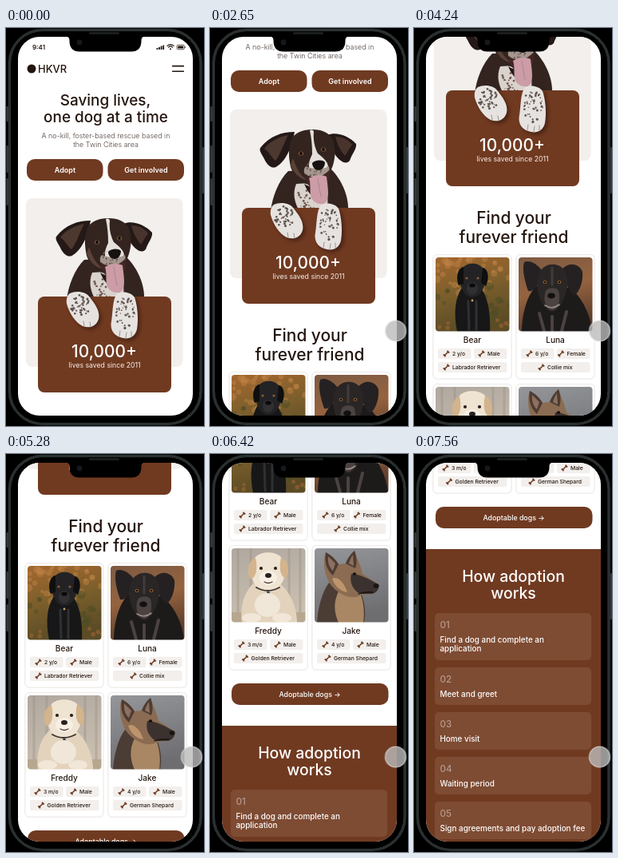
These frames come from a looping animation (248x498 px, 8000 ms). An HTML page:

```html
<!DOCTYPE html>
<html lang="en">
<head>
<meta charset="utf-8">
<title>Dog rescue app</title>
<style>
  html, body { margin: 0; width: 100%; height: 100%; overflow: hidden; background: #000; }
  svg { display: block; width: 248px; height: 498px; }
  text { font-family: Inter, "Open Sans", sans-serif; }
</style>
</head>
<body>
<svg id="stage" viewBox="0 0 248 498" xmlns="http://www.w3.org/2000/svg"></svg>
<script>
const BROWN = '#703a21', INK = '#24150e', SAND = '#f2efec';
const LOOP = 8000, STEP = 36.81;

// ---------- helpers ----------
const rect = (x, y, w, h, r, fill, more = '') =>
  `<rect x="${x}" y="${y}" width="${w}" height="${h}" rx="${r}" fill="${fill}" ${more}/>`;
const dot = (x, y, r, fill, ry = r, more = '') =>
  `<ellipse cx="${x}" cy="${y}" rx="${r}" ry="${ry}" fill="${fill}" ${more}/>`;
const path = (d, fill, more = '') => `<path d="${d}" fill="${fill}" ${more}/>`;
const line = (d, color, width) =>
  path(d, 'none', `stroke="${color}" stroke-width="${width}" stroke-linecap="round"`);
const text = (x, y, s, size, weight = 550, fill = INK, anchor = 'middle') =>
  `<text x="${x}" y="${y}" font-size="${size}" font-weight="${weight}" fill="${fill}" text-anchor="${anchor}">${s}</text>`;
const group = (x, y, body, more = '') => `<g transform="translate(${x} ${y})" ${more}>${body}</g>`;
const gradient = (id, ...colors) =>
  `<linearGradient id="${id}" x1="0" y1="0" x2=".25" y2="1">` +
  colors.map((c, i) => `<stop offset="${i / (colors.length - 1)}" stop-color="${c}"/>`).join('') +
  '</linearGradient>';
const blur = (id, amount) =>
  `<filter id="${id}" x="-30%" y="-30%" width="160%" height="160%"><feGaussianBlur stdDeviation="${amount}"/></filter>`;

let seed = 7;
const rnd = () => (seed = seed * 16807 % 2147483647) / 2147483647;
function speckle(cx, cy, rx, ry, n, fill, size = 0.9) {
  let out = '';
  for (let i = 0; i < n; i++) {
    const a = rnd() * 6.283, d = Math.sqrt(rnd());
    out += dot((cx + Math.cos(a) * d * rx).toFixed(1), (cy + Math.sin(a) * d * ry).toFixed(1),
      (size * (0.5 + rnd() * 0.7)).toFixed(2), fill);
  }
  return out;
}

// ---------- header and hero ----------
function header() {
  const bars = [0, 1, 2, 3].map(i => rect(188.5 + i * 2.6, 25 - i * 1.2, 1.8, 2 + i * 1.2, 0.5, INK)).join('');
  const wifi = [4.2, 2.5].map(r =>
    line(`M${206 - r} ${26.6 - r}Q206 ${25.4 - r * 1.55} ${206 + r} ${26.6 - r}`, INK, 1.2)).join('');
  const battery = rect(214, 21.2, 9.4, 5.6, 1.5, 'none', `stroke="${INK}" stroke-width=".7"`) +
    rect(215.2, 22.4, 7, 3.2, 0.7, INK) + rect(224, 23, 0.8, 2, 0.4, INK);
  return text(41, 27, '9:41', 8, 600) + bars + wifi + dot(206, 26.2, 1, INK) + battery +
    dot(32, 51, 5.5, INK) + text(40, 56, 'HKVR', 13, 500, INK, 'start') +
    rect(208, 46.8, 15, 1.6, 0.5, INK) + rect(208, 53.4, 15, 1.6, 0.5, INK) +
    text(124.5, 97, 'Saving lives,', 18.9) + text(125, 117.5, 'one dog at a time', 18.9) +
    text(125, 138, 'A no-kill, foster-based rescue based in', 8.95, 300, '#51443e') +
    text(125, 149, 'the Twin Cities area', 8.95, 300, '#51443e') +
    rect(26, 164, 95.5, 27, 10, BROWN) + rect(127.5, 164, 95.5, 27, 10, BROWN) +
    text(74, 181.4, 'Adopt', 9, 600, '#fff') + text(175.5, 181.4, 'Get involved', 9, 600, '#fff');
}

function heroDog() {
  const coat = '#33241f', dark = '#241916', white = '#e6e0dc';
  const body =
    path('M76 340C78 322 86 302 98 290L152 288C164 300 174 320 173 340Z', coat) +
    path('M108 306C103 318 106 330 112 340L146 340C149 328 147 314 142 304Z', '#d9d2cd') +
    speckle(126, 324, 18, 15, 40, '#6b574e', 1.2) +
    path('M118 306C126 312 140 312 147 304L147 322C138 328 126 326 118 306Z', dark);
  const ears =
    path('M106 241C90 241 75 246 63 261C61 265 66 270 69 277C73 284 79 288 84 284C92 279 97 270 102 258Z', dark) +
    path('M98 245C86 247 75 253 68 262C74 266 78 274 82 277C88 270 92 256 98 245Z', '#4d3830') +
    path('M147 245C158 240 174 246 183 256C184 262 178 268 175 277C170 283 162 277 157 270C153 264 150 255 147 245Z', dark) +
    path('M157 247C166 247 174 251 178 257C174 262 172 267 169 271C163 264 159 256 157 247Z', '#49342d');
  const head =
    path('M103 248C110 240 119 238 129 238C140 238 150 242 154 251C158 263 157 277 152 288C148 301 140 308 129 308C116 307 105 297 101 285C98 271 98 258 103 248Z', coat) +
    path('M104 274C108 286 113 296 122 301C112 301 104 291 101 282Z', '#5a4136') +
    path('M125 239C128 238 130 239 130 241C129 251 131 260 135 268C140 272 147 277 148 284C144 289 137 291 128 290C122 287 123 279 128 269C128 258 127 248 125 239Z', white) +
    path('M120 284C127 287 142 289 149 284C151 291 147 297 142 298C134 296 126 299 120 296C117 292 117 287 120 284Z', '#a4968f') +
    speckle(130, 287, 11, 9, 34, '#63514a', 0.9);
  const mouth =
    path('M119 293C126 300 140 299 149 289C152 301 147 311 138 315C128 316 119 306 119 293Z', '#432725') +
    path('M124 299C130 295 141 294 146 297C147 307 150 321 146 328C141 334 131 331 127 324C124 316 127 308 124 299Z', '#cc9da6') +
    line('M135 299Q137 313 139 322', '#b08590', 1) +
    path('M128 280C131 276 141 275 144 279C144 285 140 289 136 289C132 289 128 285 128 280Z', '#171211');
  const eye = (x, y) => dot(x, y, 3.2, '#80563d', 2.6) + dot(x, y, 1.9, '#100c0b');
  return `<g filter="url(#fur)">${body}${ears}${head}${mouth}${eye(114, 268)}${eye(142, 263)}</g>`;
}

function paws() {
  const paw = (d, cx, cy, rx, ry) =>
    group(3, 3, path(d, '#2f150a', 'opacity=".6" filter="url(#soft)"')) +
    `<g filter="url(#fur)">${path(d, '#e6e2df')}${speckle(cx, cy, rx, ry, 46, '#5f5550', 1.3)}</g>`;
  return paw('M80 332C88 328 101 330 105 337C112 346 118 354 116 364C113 374 104 376 96 373C87 369 79 356 76 345C75 339 77 334 80 332Z', 93, 347, 13, 13) +
    line('M98 373L97 367M106 374L105 368', '#9b928e', 1) +
    paw('M139 332C147 329 157 331 161 337C165 348 166 365 164 377C161 389 151 390 143 387C134 384 130 376 132 367C134 355 133 341 139 332Z', 149, 356, 12, 21) +
    line('M142 386L143 379M150 388L151 381M157 386L157 380', '#9b928e', 1);
}

const hero = () =>
  rect(25, 213, 196.5, 211, 8, SAND) + heroDog() + rect(40, 336, 167, 120, 8, BROWN) + paws() +
  text(123, 412, '10,000+', 20.9, 500, '#fff') +
  text(123.5, 425.3, 'lives saved since 2011', 8.7, 400, '#f6eeea');

// ---------- dog cards ----------
const photos = {
  Bear: () => rect(0, 0, 93, 93, 0, 'url(#autumn)') + speckle(46, 22, 50, 26, 40, '#c9894b66', 4) +
    speckle(46, 55, 50, 22, 24, '#4c4d2588', 5) + speckle(46, 84, 50, 10, 22, '#a5683588', 2.5) +
    path('M33 38C25 50 22 68 27 93L68 93C69 72 66 50 57 39Z', '#171718') +
    path('M34 13C40 6 53 6 59 13C65 20 63 37 56 45C51 51 42 51 37 46C30 38 28 21 34 13Z', '#232325') +
    path('M35 12C28 13 25 25 29 35L35 33ZM59 13C66 14 68 26 63 36L57 32Z', '#0f0f10') +
    dot(46, 39, 7, '#303033', 8) + dot(46, 35, 3.8, '#0b0b0c', 2.6) +
    dot(39, 26, 1.6, '#8b5b32') + dot(53, 26, 1.6, '#8b5b32') +
    line('M41 55L42 90M51 55L51 90', '#2f3033', 3) + dot(46, 54, 1.4, '#c4a46c'),
  Luna: () => rect(0, 0, 93, 93, 0, 'url(#umber)') +
    path('M22 36C10 48 4 72 4 93L92 93C90 72 80 50 64 38Z', '#1d1a1a') +
    path('M29 16C22 7 13 3 7 6C4 16 8 30 12 42C18 44 25 35 29 24ZM54 15C64 5 76 8 80 18C81 30 77 42 70 48C63 44 60 32 55 22Z', '#252122') +
    path('M27 18C32 7 50 5 57 16C63 26 62 38 58 48C53 62 47 68 42 68C35 67 28 57 25 46C22 35 23 26 27 18Z', '#2a2626') +
    path('M34 42C37 37 48 37 50 42C53 53 50 65 42 66C34 65 30 53 34 42Z', '#4b4341') +
    line('M42 13L42 34', '#433b39', 3) + dot(41, 48, 4.8, '#121011', 3.6) +
    line('M33 60Q42 66 51 59', '#9a8c84', 1.6) +
    [33, 51].map(x => dot(x, 31, 2.4, '#9a6432', 2) + dot(x, 31, 1.2, '#0b0909')).join('') +
    line('M26 70L32 92M60 68L54 92M42 74L42 92', '#4a4341', 4),
  Freddy: () => rect(0, 0, 93, 93, 0, 'url(#mist)') +
    line('M8 0V93M24 0V93M72 0V93M86 0V93', '#9c928677', 3) + rect(0, 80, 93, 13, 0, '#b7a78f') +
    path('M30 42C16 52 10 74 13 93L82 93C82 73 72 52 59 43Z', '#e3d3bd') +
    path('M30 11C38 3 55 4 62 11C69 21 69 38 61 46C53 54 39 54 31 47C23 39 23 21 30 11Z', '#efe3d2') +
    path('M30 12C21 15 18 29 24 39C31 36 33 25 30 12ZM62 11C71 15 74 29 68 38C61 35 59 25 62 11Z', '#d3b48c') +
    dot(46, 37, 11, '#f7efe4', 9) + dot(46, 34, 4, '#29211f', 2.9) + dot(37, 25, 2.1, '#2a1e19') + dot(55, 25, 2.1, '#2a1e19') +
    line('M41 42Q46 45 51 42', '#594036', 1.4) + line('M31 49Q45 57 60 49', '#3a332f', 1.9) + dot(46, 56, 2, '#263a49') +
    dot(45, 71, 16, '#f1e7d9', 15) + dot(25, 87, 12, '#f1e6d7', 6) + dot(63, 87, 12, '#f1e6d7', 6),
  Jake: () => rect(0, 0, 93, 93, 0, 'url(#slate)') +
    path('M18 43C9 55 4 76 3 93L62 93C65 79 62 65 58 56Z', '#4b3c34') +
    path('M30 54C22 70 26 84 30 93L61 93C63 78 61 66 57 56Z', '#a98764') +
    path('M14 5C10 16 12 32 19 44C29 58 46 65 57 59L73 57C79 55 82 49 80 45L60 32C58 21 53 13 50 3C44 8 41 14 39 19L30 20C26 13 20 8 14 5Z', '#8b6c52') +
    path('M14 5C12 17 15 27 23 34L30 20C26 13 20 8 14 5ZM50 3C44 8 41 14 39 19L51 25C54 17 52 9 50 3Z', '#4d3c33') +
    path('M17 10C16 18 19 25 23 28L26 19ZM48 8C45 12 44 16 43 19L49 22Z', '#8d7060') +
    path('M46 32C56 32 65 37 80 45C82 49 78 56 72 57L57 57C49 53 43 43 46 32Z', '#3b322f') +
    path('M22 38C28 34 37 42 41 55C32 54 25 47 22 38Z', '#bd946c') + dot(77, 47, 3.4, '#171414', 2.8) +
    dot(50, 32, 2.2, '#15100e', 1.7) + line('M55 57Q65 54 73 55', '#171313', 1.3),
};

const bone = (x, y) => group(x, y, line('M-2 2L2-2', BROWN, 1.6) +
  [[-2.9, 1.7], [-1.7, 2.9], [2.9, -1.7], [1.7, -2.9]].map(p => dot(...p, 1.1, BROWN)).join(''));
const tag = (x, y, w, tx, s) =>
  rect(x, y, w, 13, 2.5, SAND) + bone(tx - 7.5, y + 6.5) + text(tx, y + 8.9, s, 6.8, 450, INK, 'start');

// Tag labels carry their own text offset inside the card.
function dogCard(x, y, name, age, sex, breed) {
  return group(x, y,
    rect(-1, 0, 100, 157, 6, '#f7f5f4') + rect(0, 0.5, 98, 155.5, 5, '#fff', 'stroke="#eae6e3" stroke-width=".8"') +
    `<g clip-path="url(#photo)" transform="translate(3 4)"><g filter="url(#fur)">${photos[name]()}</g></g>` +
    text(49, 111, name, 10.1, 500) +
    tag(6, 118, 41.5, ...age) + tag(51, 118, 41.5, ...sex) + tag(6, 135, 86.5, ...breed));
}

const finder = () =>
  text(125, 503, 'Find your', 20.9) + text(125, 527, 'furever friend', 20.9) +
  dogCard(24, 541, 'Bear', [24, '2 y/o'], [68, 'Male'], [24, 'Labrador Retriever']) +
  dogCard(128, 541, 'Luna', [24, '6 y/o'], [63.5, 'Female'], [39, 'Collie mix']) +
  dogCard(24, 703, 'Freddy', [23, '3 m/o'], [68, 'Male'], [27.5, 'Golden Retriever']) +
  dogCard(128, 703, 'Jake', [24, '4 y/o'], [68, 'Male'], [27, 'German Shepard']) +
  rect(27, 876, 196.5, 27, 10, BROWN) + text(125, 892.8, 'Adoptable dogs →', 8.8, 500, '#fff');

// ---------- adoption steps ----------
function adoption() {
  const steps = [['Find a dog and complete an', 'application'], ['Meet and greet'], ['Home visit'],
    ['Waiting period'], ['Sign agreements and pay adoption fee']];
  let y = 1009;
  let out = rect(15, 929, 219, 500, 0, BROWN) +
    text(124.5, 970, 'How adoption', 19.4, 550, '#fff') + text(124.5, 991, 'works', 19.4, 550, '#fff');
  steps.forEach((lines, i) => {
    const h = lines.length > 1 ? 59 : 47;
    out += rect(26, y, 196, h, 5, '#7e4b33') + text(32.5, y + 19, '0' + (i + 1), 11.6, 500, '#b6998a', 'start');
    lines.forEach((s, j) => out += text(32.5, y + 36.7 + j * 11.3, s, 9.9, 500, '#fff', 'start'));
    y += h + 9;
  });
  return out;
}

// ---------- phone ----------
const sideButton = (x, y, h) => rect(x, y, 2.5, h, 1, '#34393a');
document.getElementById('stage').innerHTML =
  '<defs>' +
  '<clipPath id="screen"><rect x="15" y="11" width="219" height="474" rx="27"/></clipPath>' +
  '<clipPath id="photo"><rect width="92.5" height="92.5" rx="4"/></clipPath>' +
  blur('soft', 2) + blur('fur', 0.6) +
  gradient('autumn', '#a5672f', '#7c5f2c', '#5b4c26') + gradient('umber', '#7d5a42', '#95633f', '#5d3d2b') +
  gradient('mist', '#b0a89f', '#bdb4a8', '#cabfb0') + gradient('slate', '#95969a', '#828387', '#6e6e71') +
  '</defs>' +
  rect(0, 0, 248, 498, 0, '#000') +
  sideButton(0.5, 98, 19) + sideButton(0.5, 147, 34) + sideButton(0.5, 188, 34) + sideButton(245.5, 149, 58) +
  rect(4, 2, 240.5, 494, 42, '#000', 'stroke="#2b3031" stroke-width="2.6"') +
  rect(5.6, 3.6, 237.3, 490.8, 40.5, '#000', 'stroke="#414748" stroke-width=".8"') +
  rect(104, 5, 38, 3, 1.5, '#1b1d1e') +
  '<g clip-path="url(#screen)">' + rect(15, 11, 219, 474, 0, '#fff') +
  `<g id="page">${header()}${hero()}${finder()}${adoption()}</g></g>` +
  path('M73 10.5C78 10.5 79.5 12 79.5 16C79.5 25 84 29.5 92 29.5L157 29.5C165 29.5 169.5 25 169.5 16C169.5 12 171 10.5 176 10.5Z', '#000') +
  dot(92, 18, 3.4, '#15181c') +
  '<g id="touch">' + dot(0, 0, 13, '#bbb', 13, 'fill-opacity=".8" stroke="#e4e4e4" stroke-opacity=".75" stroke-width="1.2"') + '</g>';

// ---------- motion ----------
function hold(id, poses) {
  const frames = poses.map(([t, pose]) => ({ offset: t / LOOP, easing: 'steps(1, end)', ...pose }));
  frames.push({ ...frames[frames.length - 1], offset: 1 });
  document.getElementById(id).animate(frames, { duration: LOOP, iterations: Infinity }).startTime = 0;
}
const move = (x, y) => `translate(${x}px, ${y}px)`;

const scrolls = [0, 1570, 2190, 2650, 3050, 3250, 3840, 4240, 4510, 4580, 5110, 5280, 5430,
  5590, 5760, 5890, 6420, 6550, 6950, 7150, 7280, 7500, 7560];
hold('page', scrolls.map((t, i) => [t, { transform: move(0, -Math.ceil(i * STEP)) }]));

const touches = [[0, 234, 402, 0], [500, 234, 402, 1], [567, 233.5, 390, 1], [633, 233, 380, 1],
  [700, 232.5, 376, 1], [900, 232.5, 378, 1], [970, 232.5, 379, 1]];
hold('touch', touches.map(([t, x, y, opacity]) => [t, { transform: move(x, y), opacity }]));
</script>
</body>
</html>
```
